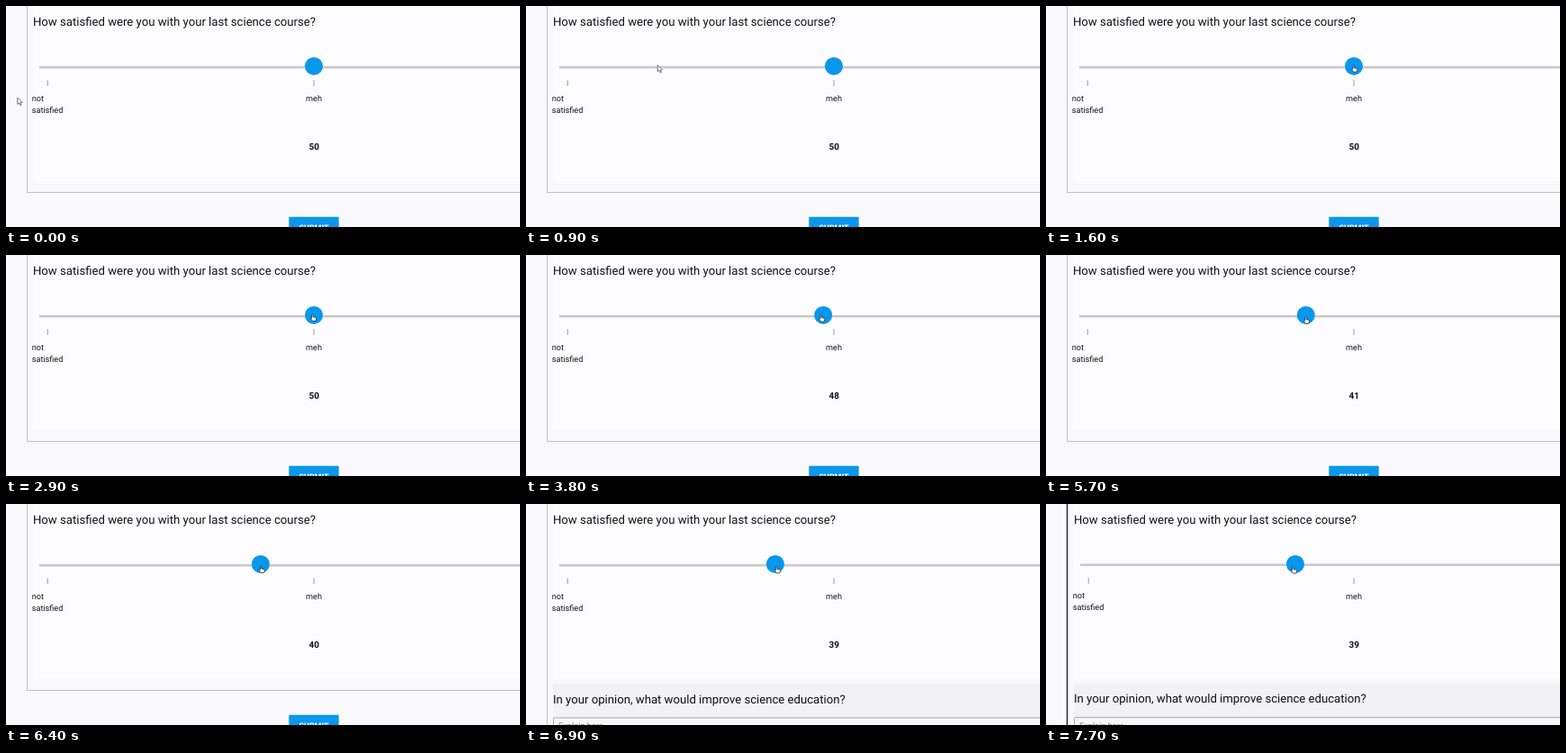
Write an HTML page that moves like this. It is 571 px wide and 246 px high and loops after 8000 ms.

```html
<!DOCTYPE html>
<html lang="en">
<head>
<meta charset="utf-8">
<title>Survey slider</title>
<style>
  html, body { margin: 0; width: 100%; height: 100%; overflow: hidden; background: #f9f8fb; }
  svg { display: block; width: 100%; height: 100%; font-family: Roboto, sans-serif; fill: #111; text-rendering: geometricPrecision; }
  .question { font-size: 13.15px; }
  .label { font-size: 9.1px; }
  .value { font-size: 10px; font-weight: 700; text-anchor: middle; }
  .submit { font-size: 9px; font-weight: 700; text-anchor: middle; fill: #fff; }
  .hint { font-size: 9.2px; fill: #777; }
</style>
</head>
<body>
<svg viewBox="0 0 571 246" preserveAspectRatio="xMinYMin slice">
  <rect width="571" height="246" fill="#f9f8fb"/>
  <rect id="gutter" x="18" width="5" height="246" fill="#fdfcfd"/>
  <rect x="30" width="560" height="195" fill="#fdfcfe"/>
  <g id="closed">
    <path d="M23 207.5H590" stroke="#c0bfc2"/>
    <rect x="314.3" y="234.7" width="55.4" height="20" rx="1" fill="#0a97ec"/>
    <text class="submit" x="342" y="249.7">SUBMIT</text>
  </g>
  <g id="content">
    <g id="followup">
      <rect x="30" y="200" width="560" height="60" fill="#f2f1f3"/>
      <text class="question" x="30" y="221.8">In your opinion, what would improve science education?</text>
      <rect x="30.5" y="238" width="560" height="24" rx="1" fill="#f7f6f8" stroke="#a9a8ab"/>
      <text class="hint" x="36" y="250">Explain here</text>
    </g>
    <text class="question" x="30" y="22">How satisfied were you with your last science course?</text>
    <path d="M37 68.2H590" stroke="#c9c8ca" stroke-width="2.6"/>
    <path d="M46.2 82.5V89" stroke="#98979a"/>
    <text class="label" x="28.8" y="105.7">not</text>
    <text class="label" x="28.8" y="118.8">satisfied</text>
  </g>
  <path d="M342 82.5V89" stroke="#98979a"/>
  <text class="label" x="333.1" y="105.7">meh</text>
  <text id="value" class="value" x="342.2" y="159.8">50</text>
  <circle id="knob" cy="66.9" r="10" fill="#0797ed"/>
  <path id="edge"/>
  <path id="arrow" d="M0 0V7.4L1.7 5.9L2.9 8.6L4.2 8L3 5.4H5.2Z" fill="#fff" stroke="#555" stroke-width=".8"/>
  <path id="hand" d="M-1.6 -3.6Q-.8 -4.4 -.2 -3.5V-1.2L2.4 -.6Q3.4 -.3 3.2 .8L2.5 3.4H-1L-3.2 .4Q-3 -.6 -1.6 .2Z"
        fill="#fff" stroke="#222" stroke-width=".75" stroke-linejoin="round"/>
</svg>
<script>
  const LOOP = 8000, TICK = 100;
  const ZERO = 46.2, UNIT = 5.916, MIDDLE = 342;
  const $ = id => document.getElementById(id);
  const [gutter, closed, content, followup, value, knob, edge, arrow, hand] =
    ['gutter', 'closed', 'content', 'followup', 'value', 'knob', 'edge', 'arrow', 'hand'].map($);

  const ramp = (t, from, to) => Math.min(1, Math.max(0, (t - from) / (to - from)));
  const show = (el, on) => el.setAttribute('display', on ? 'inline' : 'none');
  const shift = (el, x, y) => el.setAttribute('transform', `translate(${x} ${y})`);
  const set = (el, attrs) => Object.entries(attrs).forEach(([k, v]) => el.setAttribute(k, v));

  function draw(time) {
    const t = Math.floor(time % LOOP / TICK) * TICK;

    // The arrow sweeps up to the knob in an arc
    const p = ramp(t, 500, 1400);
    shift(arrow, 12.8 + 320 * p * p * (3 - 2 * p), 102 - 46 * Math.sin(2.05 * p));

    // Two drags to the left; the knob snaps to whole values
    const x = MIDDLE - 50 * ramp(t, 2300, 4700) ** 2.7 - 17.5 * ramp(t, 4900, 7300) ** 1.5;
    const v = Math.round((x - ZERO) / UNIT);
    shift(hand, x + .7, 70 + (MIDDLE - x) * .055);
    set(knob, { cx: ZERO + UNIT * v });
    value.textContent = v;

    const grab = t >= 1500, low = v < 40;
    show(arrow, !grab);
    show(hand, grab);
    show(closed, !low);
    show(followup, low);

    // The page nudges right and its edge darkens before the cut
    const nudge = ramp(t, 7500, 7700);
    shift(content, nudge, -.4 * nudge);
    set(gutter, { opacity: nudge });
    const grey = 192 - 149 * nudge;
    set(edge, {
      d: low ? 'M23.5 0V246' : 'M23.5 0V208',
      stroke: `rgb(${grey},${grey},${grey})`,
      'stroke-width': 1 + .5 * nudge
    });
  }

  const start = performance.now();
  function frame() {
    draw(performance.now() - start);
    requestAnimationFrame(frame);
  }
  frame();
</script>
</body>
</html>
```
